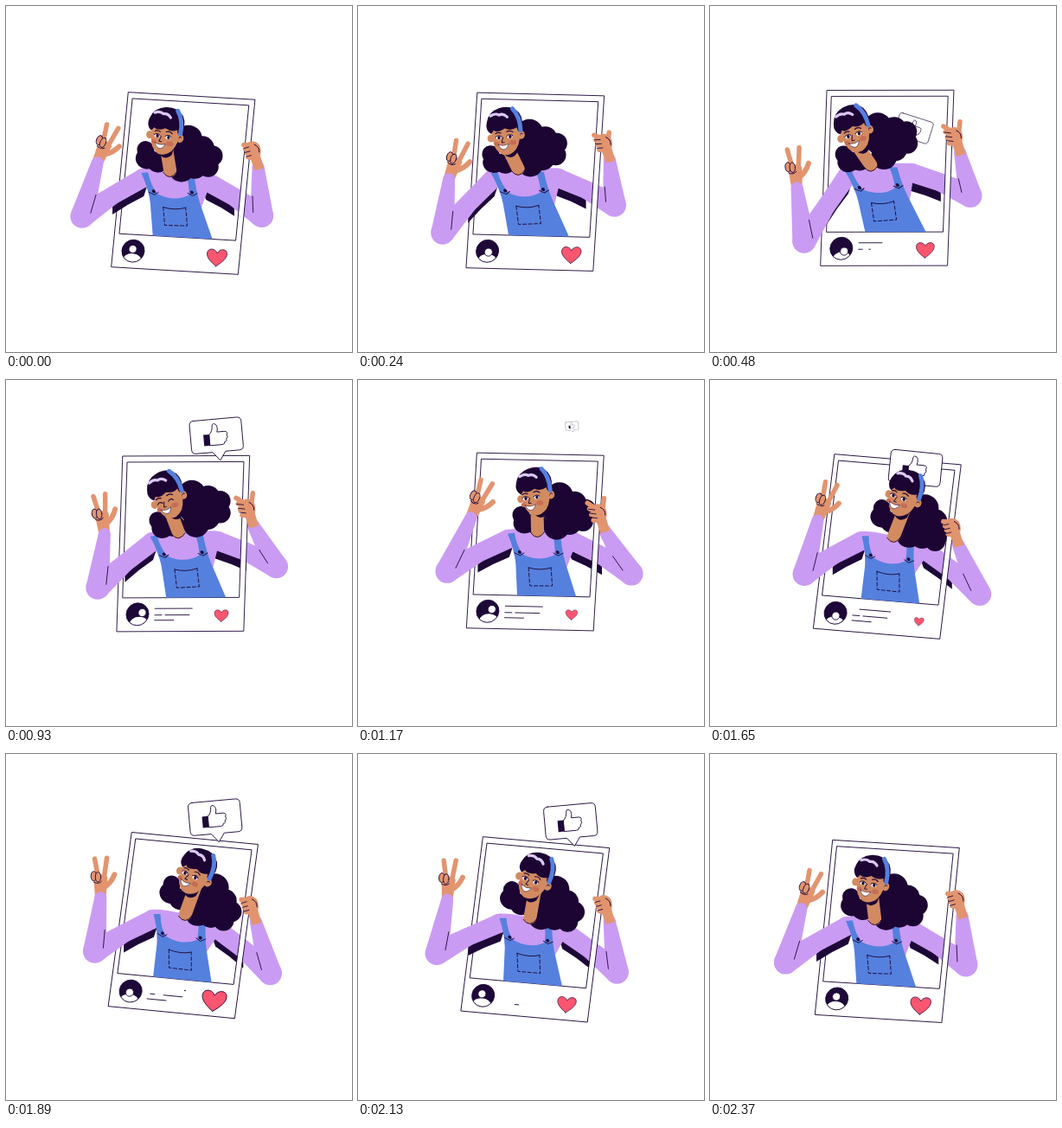
Animation of 400 by 400 pixels, one loop 2400 ms. Source, as an HTML page with a canvas:

```html
<!DOCTYPE html>
<html lang="en">
<head>
<meta charset="utf-8">
<title>Photo frame</title>
<style>
html, body { margin: 0; width: 100%; height: 100%; overflow: hidden; background: #fff; }
canvas { display: block; width: 400px; height: 400px; }
</style>
</head>
<body>
<canvas id="stage" width="400" height="400"></canvas>
<script>
const ctx = document.getElementById('stage').getContext('2d');
const LOOP = 2400, STEP = 30, TAU = Math.PI * 2;
const INK = '#1d0838', HAIR = '#1c0433', LILAC = '#ca9bf3', BLUE = '#5580de';
const SKIN = '#e2946f', FACE = '#d28a61', BLUSH = '#c66d55', RED = '#fb566f', WHITE = '#fff';
const CARD_W = 146.5, CARD_H = 203, WINDOW = 'M5.5 7H140V164H5.5Z';

const mix = (a, b, u) => a + (b - a) * u;
const clamp = v => Math.min(1, Math.max(0, v));
const ramp = (t, a, b) => clamp((t - a) / (b - a));
const smooth = u => u * u * (3 - 2 * u);
const turned = (x, y, angle) => [
  x * Math.cos(angle) - y * Math.sin(angle), x * Math.sin(angle) + y * Math.cos(angle)];

// Every part sways once per loop; the waving arm adds a second, faster beat.
function poseAt(t) {
  const p = t / LOOP;
  const sway = (mean, amp, peak) => mean + amp * Math.cos(TAU * (p - peak));
  const beat = (amp, peak) => amp * Math.cos(2 * TAU * (p - peak));

  const card = { x: 205, y: sway(196, 9, 0), angle: sway(.042, .054, .8) };
  const torso = { x: sway(201, 9, .57), y: sway(207, 8, .98), tilt: sway(.02, .1, .76), lean: sway(.19, .18, .23) };
  const head = { x: sway(195, 28, .68), y: sway(142.3, 8.5, .06), angle: sway(.03, .4, .8), turn: sway(-2, 2, .1) };
  const collar = { x: mix(torso.x, head.x, .32), y: torso.y - 24.5 };
  const shoulder = (x, y) => {
    const [dx, dy] = turned(x, y, torso.tilt);
    return [torso.x + dx, torso.y + dy];
  };
  const elbowY = sway(240, 24, .17) + beat(9, .22);
  return {
    card, torso, head, collar,
    left: [...shoulder(-35, -15), sway(102, 8, .45) + beat(7, .22), elbowY,
      sway(113, 15, .58) + beat(8, .06), elbowY - 62],
    right: [...shoulder(39, -13), sway(306, 10.5, .53), sway(234, 20, .82), sway(288, 3.5, 0), sway(180, 14, .82)],
    wave: sway(.17, .2, .72) + beat(.36, .06),
    grip: 1 - clamp(sway(.5, .8, .35)),
    hairSwing: sway(.42, .42, .77),
    avatar: [sway(2, 3.5, .38), .3 + beat(3, .2)],
    heart: heartSize(p)
  };
}
// Shrinks slowly, then pops back with a damped bounce.
function heartSize(p) {
  if (p < .7) return 17 + 6 * Math.cos(Math.PI * p / .7);
  const u = (p - .7) / .3;
  return 23 - 12 * Math.exp(-3 * u) * Math.cos(10.8 * u);
}

function paint(path, fill, line, width = .9) {
  const shape = typeof path === 'string' ? new Path2D(path) : path;
  if (fill) { ctx.fillStyle = fill; ctx.fill(shape); }
  if (line) { ctx.strokeStyle = line; ctx.lineWidth = width; ctx.stroke(shape); }
}
function oval(x, y, rx, ry = rx, fill = INK, line, width) {
  const shape = new Path2D();
  shape.ellipse(x, y, rx, ry, 0, 0, TAU);
  paint(shape, fill, line, width);
}
function stroke(x0, y0, x1, y1, color = INK, width = .9) {
  paint(`M${x0} ${y0}L${x1} ${y1}`, null, color, width);
}
function group(draw, ...matrix) {
  ctx.save();
  if (matrix.length) ctx.transform(...matrix);
  draw();
  ctx.restore();
}
function place(x, y, angle, scale, draw) {
  const [c, s] = turned(scale, 0, angle);
  group(draw, c, s, -s, c, x, y);
}
function cardMatrix({ x, y, angle }) {
  const [ux, uy] = turned(1, 0, angle), [vx, vy] = turned(0, 1, angle + .038);
  return new DOMMatrix([ux, uy, vx, vy, x, y]).translate(-CARD_W / 2, -CARD_H / 2);
}

function limb(points, radii, color) {
  radii.forEach((r, i) => {
    const [x, y, nx, ny] = points.slice(i * 2, i * 2 + 4), q = radii[i + 1];
    oval(x, y, r, r, color);
    if (q === undefined) return;
    const d = Math.hypot(nx - x, ny - y), px = (y - ny) / d, py = (nx - x) / d;
    paint(`M${x + px * r} ${y + py * r}L${nx + px * q} ${ny + py * q}
      L${nx - px * q} ${ny - py * q}L${x - px * r} ${y - py * r}Z`, color);
  });
}
function underarm([sx, sy, ex, ey], side) {
  const x = u => mix(sx, ex, u), y = u => mix(sy, ey, u);
  paint(`M${sx - side * 5} ${sy + 9}L${x(.5)} ${y(.5) + 8}L${x(.5)} ${y(.5) + 20}
    Q${x(.25)} ${y(.25) + 19} ${sx - side} ${sy + 21}Z`, INK);
}
function sleeve([sx, sy, ex, ey, wx, wy], side) {
  limb([sx, sy, mix(sx, ex, .5), mix(sy, ey, .5) - 2, ex, ey, wx, wy], [11, 10.5, 13.5, 7], LILAC);
  stroke(ex - side * 10, ey - 4, mix(ex, wx, .4) - side * 9, mix(ey, wy, .4));
}

function leftHand({ left, wave }) {
  place(left[4], left[5], wave, 1, () => {
    paint('M-6 3L-8 -22Q0 -31 8 -24L6 3Z', SKIN);
    stroke(-3, -24, -7, -45, SKIN, 5.5);
    stroke(4, -24, 7, -46, SKIN, 5.5);
    paint('M4 -12Q12 -17 16 -27', null, SKIN, 6);
    oval(-8, -25, 3.3, 5.5, SKIN, INK);
    oval(-3, -24, 3.2, 5.8, SKIN, INK);
    paint('M-8 -18Q-2 -15 1 -19', null, INK);
  });
}
function rightHand({ right, grip }) {
  const open = 1 - grip;
  place(right[4], right[5], -.28, 1, () => {
    paint('M-5 3L-6 -12Q-11 -20 -6 -29Q2 -34 8 -25Q10 -19 6 -12L6 3Z', SKIN);
    for (let i = 0; i < 4; i++) {
      const y = i * 5 - 29;
      stroke(-3, y + 2, i * .4 - 9 - open, y - open * (6 - i * 2), SKIN, 5.5);
    }
    if (open > .1) stroke(5, -23, 6 + open * 4, -25 - open * 10, SKIN, 5.5);
    for (let i = 0; i < 3; i++) {
      stroke(-10 - open, i * 5 - 25 - open * 3, -4, i * 5 - 25, INK, .8);
    }
    paint('M3 -26Q8 -22 6 -16', null, INK);
  });
}

// Bars are drawn on from the left, then wiped away from the left.
function bar(t, x, width, y, drawAt, wipeAt) {
  const from = ramp(t, wipeAt, wipeAt + 300), to = ramp(t, drawAt, drawAt + 320);
  if (to > from) stroke(x + width * from, y, x + width * to, y);
}
function caption(t) {
  bar(t, 43, 43, 176.5, 280, 1600);
  bar(t, 43, 8, 184, 300, 1780);
  bar(t, 55, 28, 184, 460, 1820);
  bar(t, 43, 22, 190, 500, 1890);
}
function avatar([dx, dy]) {
  const disc = new Path2D();
  disc.arc(23, 183, 13, 0, TAU);
  paint(disc, INK);
  group(() => {
    ctx.clip(disc);
    oval(23 + dx * .4, 194 + Math.max(0, dy) * .3, 11, 8, WHITE);
    oval(23 + dx, 183 + dy, 4.6, 4.6, WHITE, INK);
  });
  paint(disc, null, INK);
}
function card(t, pose, matrix) {
  group(() => {
    const border = new Path2D(`M0 0H${CARD_W}V${CARD_H}H0Z${WINDOW}`);
    ctx.fillStyle = WHITE;
    ctx.fill(border, 'evenodd');
    paint(border, null, INK);
    caption(t);
    avatar(pose.avatar);
    place(120, 185, 0, pose.heart / 23, () => paint(
      'M0 10C-7 5 -12 0 -11.5 -5C-11 -11 -2.5 -11 0 -5C2.5 -11 11 -11 11.5 -5C12 0 7 5 0 10Z', RED, INK, .7));
  }, ...'abcdef'.split('').map(k => matrix[k]));
}

function bubble(age, cardY) {
  if (age <= 0 || age >= 870) return;
  const rise = smooth(ramp(age, 0, 450)), fade = ramp(age, 750, 870);
  const scale = Math.min(1, age / 220) * (1 - fade);
  place(233 + age * .017, mix(165, cardY - 125, rise) - 12 * fade, mix(.45, -.09, rise), scale, () => {
    paint('M-25 -19H25Q30 -19 30 -14V14Q30 19 25 19H9L2 29L-6 19H-25Q-30 19 -30 14V-14Q-30 -19 -25 -19Z', WHITE, INK);
    paint('M-8 -2Q-4 -5 -4 -12Q-3 -15 0 -13Q3 -10 1 -4H10Q14 -3 12 0Q14 3 11 5Q12 8 9 8Q9 11 6 11H-8Z', WHITE, INK);
    paint('M-15 -2H-8V11H-15Z', INK);
  });
}

function torso({ torso: { x, y, tilt, lean }, left: [lx, ly], right: [rx, ry], collar }) {
  const hip = x + lean * 20;
  paint(`M${lx - 5} ${ly - 10}Q${lx + 6} ${ly - 13} ${collar.x - 9} ${collar.y - 2}H${collar.x + 9}L${rx} ${ry - 11}
    L${rx + 2} ${ry + 8}L${hip + 28} ${y + 20}H${hip - 28}L${lx + 4} ${ly + 8}Z`, LILAC);
  group(() => {
    paint('M-32 -21L-24 -22Q-24 -5 -18 3Q0 12 18 3Q21 -8 20 -21L29 -20Q27 0 29 14L38 80H-38L-29 14Q-27 0 -32 -21Z', BLUE);
    for (const side of [-1, 1]) {
      paint(`M${side * 28} 1L${side * 22} 4L${side * 17} 1`, null, INK);
      oval(side * 22, 0, 2);
    }
    ctx.transform(1, 0, -lean * .6, 1, lean * 11, 0);
    paint('M-15 18Q-2 22 11 18', null, INK);
    ctx.setLineDash([4, 2.5]);
    paint('M-15 18V39H11V18', null, INK);
  }, Math.cos(tilt), Math.sin(tilt), lean, 1, x, y);
}

// Curls hang around the head: distance, angle behind the swing, radius.
const CURLS = [[28, -.35, 16], [46, -.16, 14], [60, -.08, 12], [62, .14, 12], [50, .32, 14], [43, .62, 15]];
function curls({ head: { x, y, angle }, hairSwing }) {
  const web = new Path2D();
  web.moveTo(x + 4, y);
  for (const [distance, lag, radius] of CURLS) {
    const [dx, dy] = turned(distance, 0, hairSwing + lag);
    oval(x + dx, y + dy, radius, radius, HAIR);
    web.lineTo(x + dx, y + dy);
  }
  web.closePath();
  paint(web, HAIR, HAIR, 12);
  place(x, y, angle, 1, () => {
    oval(-19, 19, 10, 10, HAIR);
    oval(-16, 29, 13, 12, HAIR);
    oval(-3, 31, 13, 12, HAIR);
  });
}

function eye(x, closed) {
  if (closed) return paint(`M${x - 3} 2Q${x} -1.5 ${x + 3} 2`, null, INK, 1.1);
  oval(x, 1, 3, 2.2, WHITE);
  oval(x + .4, 1, 1.7, 2);
  paint(`M${x - 3.5} 0Q${x} -3 ${x + 3.5} 0`, null, INK);
}
function head(t, { head: { x, y, angle, turn }, collar }) {
  const closed = t > 810 && t < 1020;
  stroke(x + 2, y + 12, collar.x, collar.y, FACE, 15);
  paint(`M${collar.x - 8} ${collar.y + 2}q8 11 16 -1`, null, INK);
  place(x, y, angle, 1, () => {
    paint('M-6 18Q3 27 13 11L12 20Q6 28 -1 23Z', HAIR);
    oval(-17, 1, 4, 4.5, FACE);
    oval(18, 0, 4.5, 5, FACE);
    paint('M16 1Q18 -3 20 -1', null, INK);
    paint('M-16 -10L17 -10Q18 7 11 16Q3 24 -5 21Q-14 16 -15 3Z', FACE);
    group(() => {
      oval(8, 8, 4, 2.8, BLUSH);
      oval(-11, 8, 2.5, 2.5, BLUSH);
      eye(-8, closed);
      eye(5, closed);
      paint('M-11 -4Q-8 -6 -5 -4M2 -5Q6 -7 9 -4', null, INK, 1.2);
      paint('M-3 1L-5 7L-2 7', null, INK);
      paint('M-9 9Q-3 12 3 9Q0 16 -4 15Q-8 14 -9 9Z', WHITE, INK, .5);
    }, 1, 0, 0, 1, turn, 0);
    paint('M-16 -4Q-23 -9 -20 -18Q-17 -30 -4 -33Q10 -36 18 -26Q24 -16 18 -3Q14 -4 14 -9Q7 -5 0 -9Q-9 -4 -13 -8Z', HAIR);
    paint('M11 -31Q19 -21 18 -5', null, BLUE, 5);
    paint('M-15 -25Q-9 -28 -5 -25Q0 -27 4 -22', null, '#dcc8fa', 3.2);
  });
}

function draw(t) {
  ctx.fillStyle = WHITE;
  ctx.fillRect(0, 0, 400, 400);
  const pose = poseAt(t), matrix = cardMatrix(pose.card);
  underarm(pose.right, 1);
  sleeve(pose.right, 1);
  card(t, pose, matrix);
  for (const start of [330, 1380]) bubble(t - start, pose.card.y);
  underarm(pose.left, -1);
  leftHand(pose);
  sleeve(pose.left, -1);
  group(() => {
    const opening = new Path2D();
    opening.addPath(new Path2D(WINDOW), matrix);
    ctx.clip(opening);
    torso(pose);
    curls(pose);
    head(t, pose);
  });
  rightHand(pose);
}

ctx.lineCap = ctx.lineJoin = 'round';
let start;
function tick(now) {
  start ??= now;
  draw(Math.floor((now - start) % LOOP / STEP) * STEP);
  requestAnimationFrame(tick);
}
draw(0);
requestAnimationFrame(tick);
</script>
</body>
</html>
```
